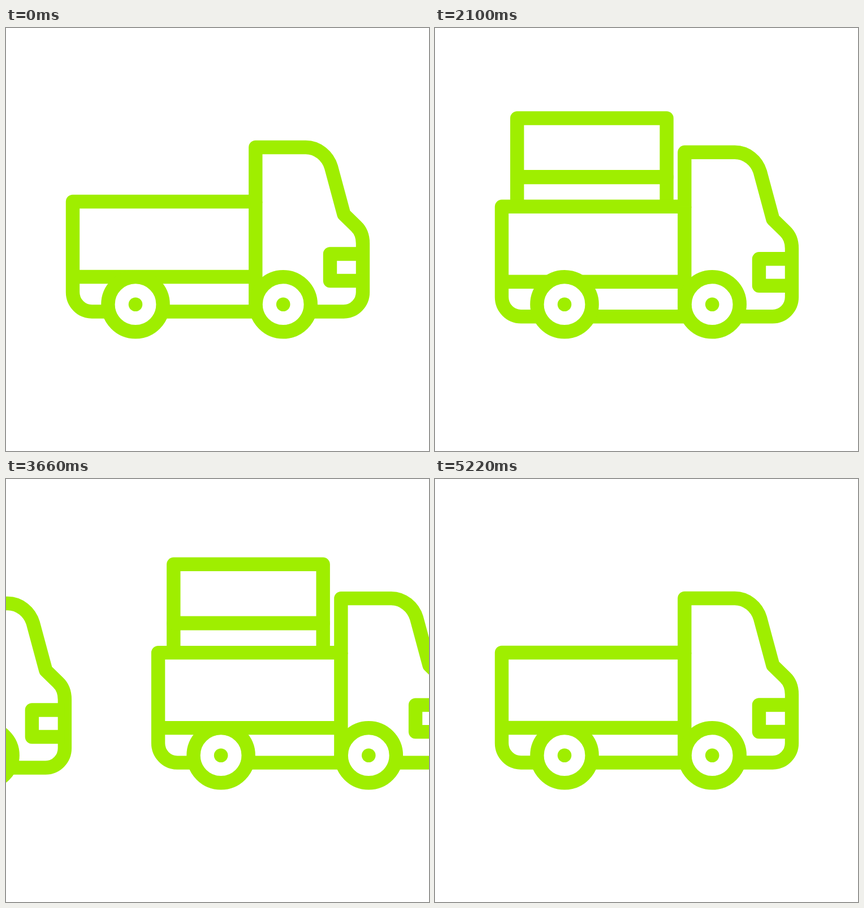
These frames come from a looping animation (748 px wide and 748 px high, 5400 ms). An HTML page:

```html
<!DOCTYPE html>
<html lang="en">
<head>
<meta charset="utf-8">
<title>Truck loading</title>
<style>
  html, body { margin: 0; height: 100%; overflow: hidden; background: #fff; }
  svg { display: block; width: 100vw; height: 100vh; }
  .line { fill: none; stroke: #9fee00; stroke-width: 24.4; stroke-linejoin: round; }
  .solid { fill: #fff; }
</style>
</head>
<body>
<svg viewBox="0 0 748 748">
  <defs>
    <g id="body" class="line">
      <path class="solid" d="M118 307H441.3V211H530C551 211 569 226 575 246L597.5 329.5L619 350.5
        C627 358 631 369 631 381V467C631 486 616 501.5 597 501.5H152C133 501.5 118 486 118 467Z"/>
      <path d="M118 440H441M441.3 307V501M631 399.5H573V447H631"/>
    </g>
    <g id="wheel">
      <circle class="line solid" cy="488.7" r="48.6"/>
      <circle cy="488.7" r="12.3" fill="#9fee00"/>
    </g>
    <g id="wheels">
      <use href="#wheel" x="229"/>
      <use href="#wheel" x="490.2"/>
    </g>
    <rect id="box" class="line" x="145.2" width="264.4" height="104.5"/>
  </defs>
  <g id="loaded">
    <g class="sprung">
      <use id="box1" href="#box"/>
      <use id="box2" href="#box"/>
      <use href="#body"/>
    </g>
    <use href="#wheels"/>
  </g>
  <g id="empty">
    <g class="sprung"><use href="#body"/></g>
    <use href="#wheels"/>
  </g>
</svg>
<script>
const LOOP = 5400, STEP = 30, DEPART = 2975, ARRIVED = 5220;
const FALL = 573, DROP_FROM = -155;
const $ = id => document.getElementById(id);

const part = (t, start, length) => Math.min(1, Math.max(0, (t - start) / length));
const ease = p => (1 - Math.cos(Math.PI * p)) / 2;
const glide = (t, start, length, distance) => distance * ease(part(t, start, length));
// One press of the suspension: down 9 px and back up
const dip = (t, start, length) => 9 * ease(2 * part(t, start, length));

const move = (el, x, y) => el.setAttribute('transform', `translate(${x} ${y})`);

function placeTruck(id, x, sink) {
  move($(id), x, 0);
  move($(id).querySelector('.sprung'), 0, sink);
}

function dropBox(id, t, start, rest) {
  move($(id), 0, DROP_FROM + (rest - DROP_FROM) * part(t, start, FALL));
}

function draw(t) {
  dropBox('box1', t, 0, 254.5);
  dropBox('box2', t, 1183, 150.7);

  // The loaded truck backs up a little, then drives off
  placeTruck('loaded',
    glide(t, 2388, 587, -73) + glide(t, DEPART, 1862, 751),
    dip(t, 573, 622) + dip(t, 1756, 622) + dip(t, 2385, 1240) + dip(t, 3625, 1160));

  if (t < ARRIVED) {
    placeTruck('empty', -660.5 + glide(t, 2985, 2275, 660.5),
      dip(t, 3130, 1060) + dip(t, 4190, 1060));
  } else {
    placeTruck('empty', 0, 0);
  }
  $('empty').style.display = t < DEPART ? 'none' : '';
}

const begin = performance.now();
function tick() {
  const t = (performance.now() - begin) % LOOP;
  draw(Math.floor(t / STEP) * STEP);
  requestAnimationFrame(tick);
}
tick();
</script>
</body>
</html>
```
